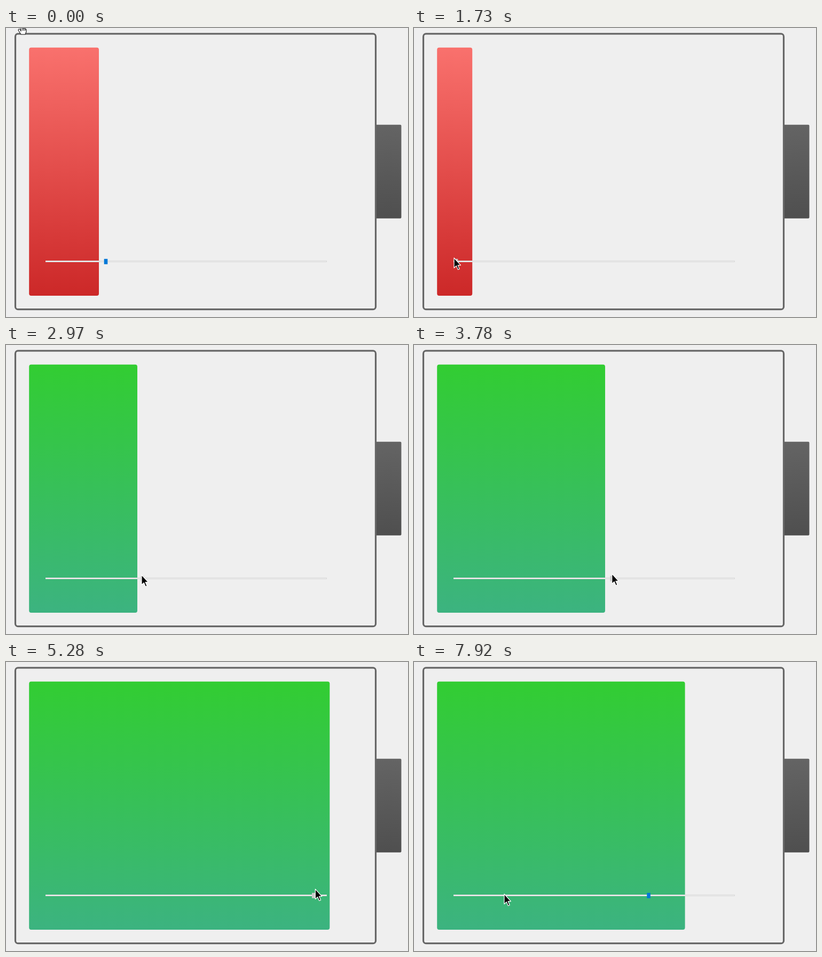
Recreate the animation shown at these times as an HTML page with a canvas. Size 753x543 px, loop 8 s.

```html
<!DOCTYPE html>
<html lang="en">
<head>
<meta charset="utf-8">
<title>Battery level slider</title>
<style>
html, body { margin: 0; width: 753px; height: 543px; overflow: hidden; background: #efefef; }
canvas { display: block; }
</style>
</head>
<body>
<canvas width="753" height="543"></canvas>
<script>
const ctx = document.querySelector('canvas').getContext('2d');
const LOOP = 8000;
const TICK = 114.75;            // the picture advances in discrete ticks
const GRAB = 9, RELEASE = 50;   // slider drag, in ticks

// Key points: [tick, x, y]
const pointerPath = [[0, 28, -2], [5, 203, 507], [7, 182, 432], [9, 164, 432], [10, 122, 432],
  [13, 68, 432], [15, 75, 432], [19, 175, 432], [26, 254, 432], [31, 319, 431], [40, 552, 426],
  [49, 593, 427], [51, 517, 430], [52, 273, 436], [54, 178, 438], [56, 169, 436]];
// Right edge of the lagging level while dragging: [tick, x]
const levelPath = [[0, 174], [8, 174], [10, 151], [14, 96], [19, 162], [26, 246], [31, 318], [40, 498], [49, 660.5]];

// Three key presses, each lowering the value by 10 %
const presses = [55.4, 64, 66.9];
const PRESS_DELAY = 1.6, EASE_TICKS = 4.4;

const clamp = (v, min, max) => Math.min(Math.max(v, min), max);
const sum = list => list.reduce((a, b) => a + b, 0);

function smooth(p) {
  const q = clamp(p, 0, 1);
  return q * q * (3 - 2 * q);
}

function sample(keys, n) {
  const i = keys.findIndex(k => k[0] > n);
  if (i < 0) return keys.at(-1).slice(1);
  const [a, b] = [keys[i - 1], keys[i]];
  const f = (n - a[0]) / (b[0] - a[0]);
  return a.slice(1).map((v, j) => v + (b[j + 1] - v) * f);
}

function thumbAt(n, pointerX) {
  if (n < GRAB) return 187;
  if (n < RELEASE) return clamp(pointerX * 0.986 + 5.1, 77.5, 596.5);
  return 596.5 - 52.3 * presses.filter(p => n >= p + PRESS_DELAY).length;
}

function levelAt(n) {
  return sample(levelPath, n)[0] - 62 * sum(presses.map(p => smooth((n - p) / EASE_TICKS)));
}

function gradient(top, bottom, from, to) {
  const g = ctx.createLinearGradient(0, top, 0, bottom);
  g.addColorStop(0, from);
  g.addColorStop(1, to);
  return g;
}

function rect(x, y, w, h, color, radius = 0) {
  ctx.fillStyle = color;
  ctx.beginPath();
  ctx.roundRect(x, y, w, h, radius);
  ctx.fill();
}

function drawShape(path, x, y, fill, stroke) {
  ctx.save();
  ctx.translate(x, y);
  ctx.fillStyle = fill;
  ctx.strokeStyle = stroke;
  ctx.lineWidth = 1.2;
  ctx.lineJoin = 'round';
  ctx.fill(path);
  ctx.stroke(path);
  ctx.restore();
}

const arrow = new Path2D('M0 0V18.8L4.3 14.8L7.4 21.9L10.2 20.7L7.1 13.7H12.4Z');
const hand = new Path2D('M0 8V-4H3V3L5 2L8 3L10 5V9L8 14H0L-5 6L-4 4L-2 4Z M3 3V7 M5.5 3V7 M8 4V7');

function draw(time) {
  const n = Math.floor((time + 14) / TICK);
  const [px, py] = sample(pointerPath, n);
  const thumb = thumbAt(n, px);
  const low = (thumb - 77.5) / 5.2 < 30;

  rect(0, 0, 753, 543, '#efefef');
  rect(691, 181.7, 49.5, 176, gradient(182, 357, '#646464', '#4f4f4f'), 2);
  ctx.strokeStyle = '#666';
  ctx.lineWidth = 3.2;
  ctx.beginPath();
  ctx.roundRect(17.5, 10.9, 675, 517.8, 5);
  ctx.stroke();

  const colors = low ? ['#f9716d', '#cc2828'] : ['#32cd32', '#3cb380'];
  rect(43.2, 36.7, levelAt(n) - 43.2, 466.3, gradient(37, 503, ...colors), 4);

  rect(74, 437, 527, 3, '#d8d8d8');
  rect(74, 438, 526, 1, '#f1f1f1');

  const hovered = n >= 7 && n < GRAB;
  const dragged = n >= GRAB && n < RELEASE;
  rect(thumb - 3.3, 433.8, 6.6, 10, dragged ? '#ccc' : hovered ? '#171717' : '#0078d7');

  if (n < 1) drawShape(hand, px, py, '#fff', '#222');
  else drawShape(arrow, px, py, '#000', '#fff');
}

function tick() {
  draw(performance.now() % LOOP);
  requestAnimationFrame(tick);
}
tick();
</script>
</body>
</html>
```
